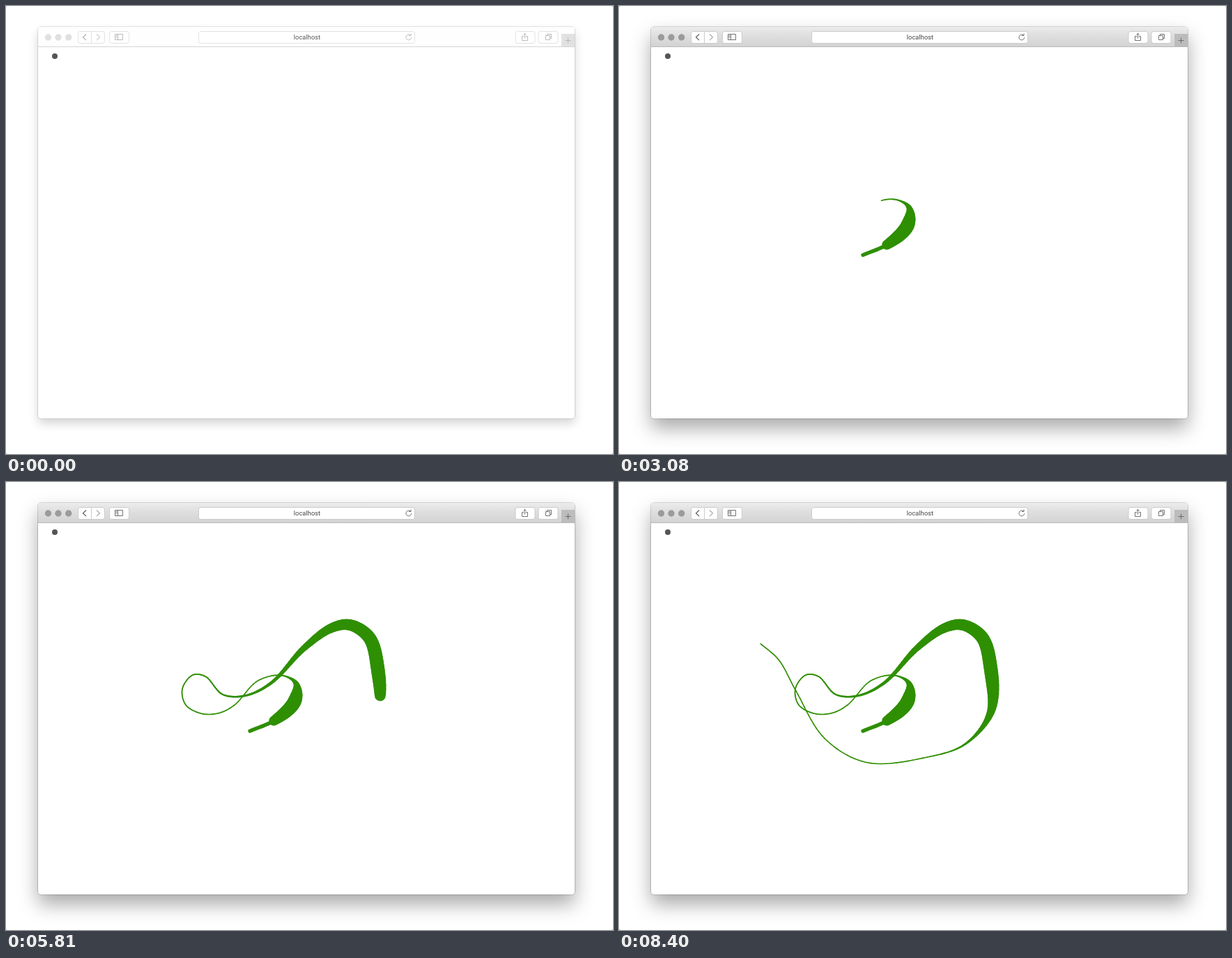
These frames come from a looping animation (871 by 643 pixels, 9.1 s). An HTML page with a canvas:

```html
<!DOCTYPE html>
<html lang="en">
<head>
<meta charset="utf-8">
<title>Brush stroke</title>
<style>
html, body { margin: 0; width: 100%; height: 100%; overflow: hidden; }
html { background: #999; }
body { position: relative; background: #fff; border-radius: 2px; }
svg, canvas { position: absolute; left: 0; top: 0; }
#window {
  --bar: #fefefe; --edge: #d6d6d6; --key: #e2e2e2; --light: #e0e0e0;
  --icon: #b4b4b4; --dim: #cfcfcf; --tab: #e1e1e1; --text: #555;
  position: absolute; left: 46px; top: 30px; width: 770px; height: 562px;
  border-radius: 4px; background: #fff;
  box-shadow: 0 0 0 .6px rgba(0,0,0,.2), 0 7px 14px rgba(0,0,0,.17);
}
#window.active {
  --bar: linear-gradient(#ececec, #e0e0e0 40%, #d3d3d3); --edge: #b9b9b9; --key: #cbcbcb; --light: #9b9b9b;
  --icon: #626262; --dim: #ababab; --tab: #bcbcbc; --text: #444;
  box-shadow: 0 0 0 .6px rgba(0,0,0,.28), 0 14px 28px rgba(0,0,0,.34);
}
#bar { height: 28px; border-bottom: 1px solid var(--edge); border-radius: 4px 4px 0 0; background: var(--bar); }
#window svg { left: -46px; top: -30px; }
.key { fill: #fff; stroke: var(--key); }
.icon { fill: none; stroke: var(--icon); stroke-width: .9; }
.light { fill: var(--light); }
text { font: 9.4px Roboto, Inter, sans-serif; fill: var(--text); text-anchor: middle; }
</style>
</head>
<body>
<div id="window">
  <div id="bar"></div>
  <svg width="871" height="643">
    <g class="light">
      <circle cx="60.5" cy="45" r="4.7"/><circle cx="75" cy="45" r="4.7"/><circle cx="89.7" cy="45" r="4.7"/>
    </g>
    <g class="key">
      <rect x="103.5" y="36.5" width="38" height="17" rx="3"/>
      <path d="M122.5 37v16"/>
      <rect x="148.5" y="36.5" width="28" height="17" rx="3"/>
      <rect x="276.5" y="36.5" width="310" height="17" rx="3"/>
      <rect x="731" y="36.5" width="28" height="17" rx="3"/>
      <rect x="764" y="36.5" width="28" height="17" rx="3"/>
    </g>
    <path d="M797 40h19v18h-19z" fill="var(--tab)"/>
    <g class="icon">
      <path d="M115 40.5l-4.5 4.3 4.5 4.3" style="stroke-width:1.3"/>
      <path d="M130 40.5l4.5 4.3-4.5 4.3" style="stroke:var(--dim);stroke-width:1.2"/>
      <path d="M156.5 40.5h11v8h-11zM160.5 40.5v8M157.5 42.5h2M157.5 44.5h2"/>
      <path d="M580.5 42.1a3.9 3.9 0 1 0 1.2 3M578 42.4h3v-3"/>
      <path d="M743 43.5h-2.5v6h8v-6h-2.5M744.5 46.5v-7M742.3 41.5l2.2-2.2 2.2 2.2"/>
      <path d="M774.5 42.5h6v6h-6zM776.5 42.5v-2h6v6h-2"/>
      <path d="M806.5 45.5v8M802.5 49.5h8"/>
    </g>
    <text x="432" y="48.3">localhost</text>
    <circle cx="70" cy="72" r="4" fill="#555"/>
  </svg>
</div>
<canvas id="paper" width="871" height="643"></canvas>
<script>
const LOOP = 9100, TICK = 70, FOCUS_AT = 630, SAMPLES = 12;
const browser = document.getElementById('window');
const ctx = document.getElementById('paper').getContext('2d');

// Turning points of the stroke.
const knots = [
  [350,357.5], [387,341], [414,315], [416,289], [395,277.5], [361,285.5], [328,320],
  [306,331.5], [281,332.5], [258,320], [253,297], [268,277], [286,279], [311,305],
  [344,306.5], [381,288], [427,239], [466,210], [493,205], [521,223], [533,265],
  [533.5,330], [497,376], [442,395], [355,402.5], [295,368], [254,300], [229,255], [203,232]
];

// Time in ms and the length drawn by then; the hand slows down and speeds up.
const pace = [[2030,0], [2310,56], [2940,127], [4900,430], [5320,588], [5880,755], [6650,879], [7560,1220]];

const mix = (a, b, u) => a + (b - a) * u;
const span = (a, b) => Math.sqrt(Math.hypot(b[0] - a[0], b[1] - a[1]));

function slope(i, axis) {
  const [a, b, c] = [knots[i - 1], knots[i], knots[i + 1]];
  const before = a && (b[axis] - a[axis]) / span(a, b);
  const after = c && (c[axis] - b[axis]) / span(b, c);
  if (!a) return after;
  if (!c) return before;
  return before + after - (c[axis] - a[axis]) / (span(a, b) + span(b, c));
}

// Centripetal spline through the knots.
function curve(i, u, axis) {
  const a = knots[i], b = knots[i + 1], d = span(a, b);
  return mix(a[axis], b[axis], u * u * (3 - 2 * u))
    + d * u * (1 - u) * (slope(i, axis) * (1 - u) - slope(i + 1, axis) * u);
}

// Pressure swells twice, each time with its own rise and fall.
function swell(length, peak, rise, fall) {
  const z = (length - peak) / (length < peak ? rise : fall);
  return 18 * Math.exp(-z * z / 2);
}

function widthAt(length) {
  if (length < 37) return 5.3;
  return 1.6 + swell(length, 76, 45, 18) + swell(length, 695, 118, 53);
}

const trail = [{ x: knots[0][0], y: knots[0][1], length: 0 }];
for (let i = 0; i < knots.length - 1; i++) {
  for (let s = 1; s <= SAMPLES; s++) {
    const last = trail[trail.length - 1];
    const x = curve(i, s / SAMPLES, 0), y = curve(i, s / SAMPLES, 1);
    trail.push({ x, y, length: last.length + Math.hypot(x - last.x, y - last.y) });
  }
}

function lengthAt(time) {
  const next = pace.findIndex(key => key[0] > time);
  if (next === 0) return -1;
  if (next < 0) return Infinity;
  const [t0, l0] = pace[next - 1], [t1, l1] = pace[next];
  return mix(l0, l1, (time - t0) / (t1 - t0));
}

function paint(end) {
  ctx.clearRect(0, 0, 871, 643);
  ctx.strokeStyle = '#2f8f02';
  ctx.lineCap = 'round';
  for (let i = 1; i < trail.length && trail[i - 1].length <= end; i++) {
    const a = trail[i - 1], b = trail[i];
    const part = Math.min(1, (end - a.length) / (b.length - a.length));
    ctx.lineWidth = widthAt(a.length);
    ctx.beginPath();
    ctx.moveTo(a.x, a.y);
    ctx.lineTo(mix(a.x, b.x, part), mix(a.y, b.y, part));
    ctx.stroke();
  }
}

function frame() {
  const time = Math.floor(performance.now() % LOOP / TICK) * TICK;
  browser.classList.toggle('active', time >= FOCUS_AT);
  paint(lengthAt(time));
  requestAnimationFrame(frame);
}
frame();
</script>
</body>
</html>
```
